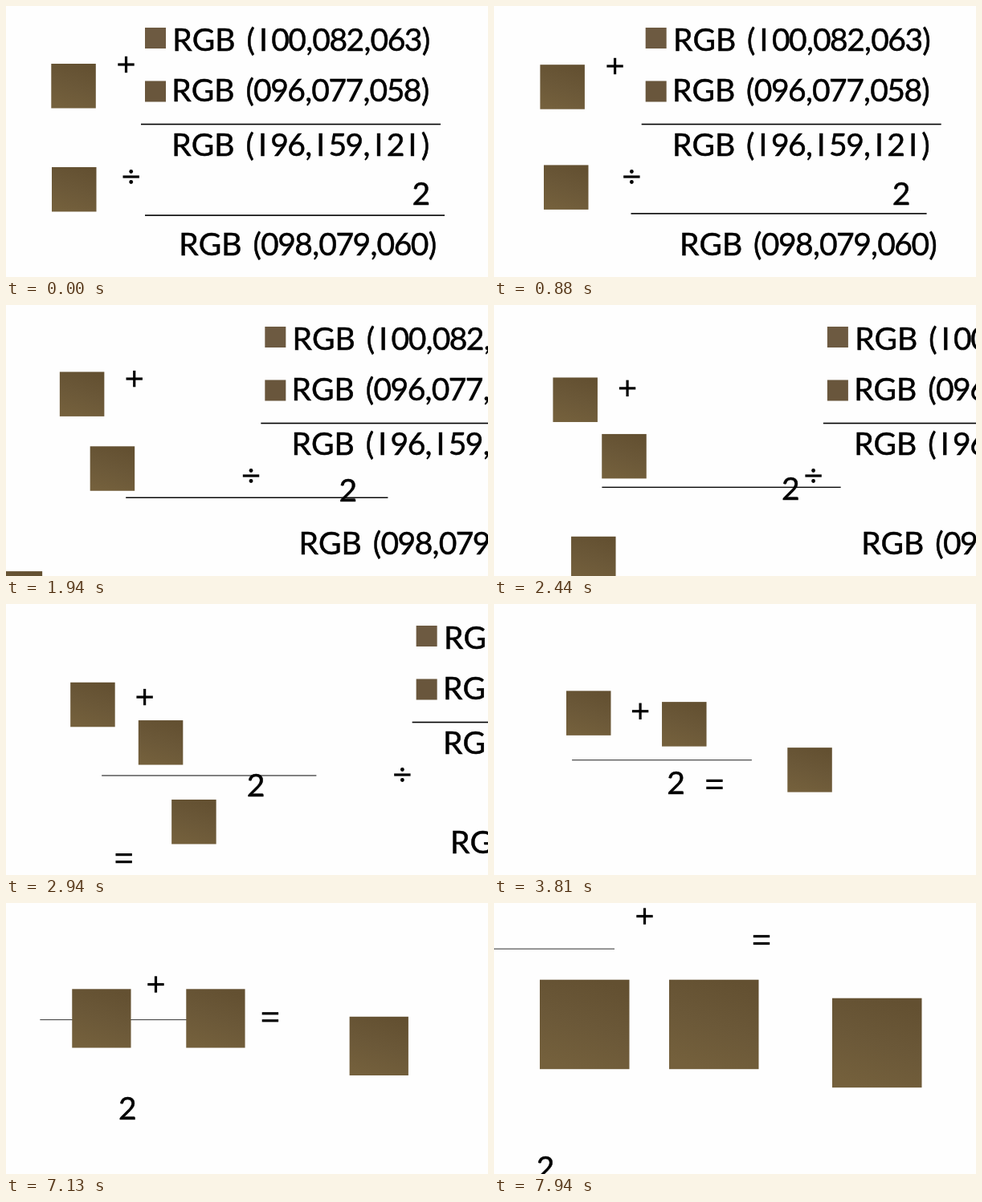
These frames come from a looping animation (600 px wide and 338 px high, 8 s). An HTML page with a canvas:

```html
<!DOCTYPE html>
<html>
<head>
<meta charset="utf-8">
<style>
html, body { margin: 0; width: 100%; height: 100%; overflow: hidden; background: #fefefe; }
canvas { display: block; }
</style>
</head>
<body>
<canvas id="stage" width="600" height="338"></canvas>
<script>
const ctx = document.getElementById('stage').getContext('2d');
const LOOP = 8000, STEP = 62.5, MOVE = 4330;
const INK = '#000';

const ease = (t, start) => {
  const u = Math.min(1, Math.max(0, (t - start) / MOVE));
  return (1 - Math.cos(Math.PI * u)) / 2;
};
const FIRST = 400, SECOND = 6185;
const lastEase = ease(LOOP - STEP, SECOND);

// Each part: its values at the start, in the fraction layout, and at the end of the loop.
const parts = {
  left:   [[56.3, 72, 55.5], [94, 112.7, 55.5], [57, 95.7, 111.5]],
  right:  [[57, 201, 55.5], [227.2, 112.7, 55.5], [218, 95.7, 111.5]],
  result: [[-182, 402, 55.5], [430.7, 152.5, 55.5], [421, 118.7, 111.5]],
  plus:   [[149.5, 73], [186, 141], [187.5, 16.5]],
  equals: [[-165, 542], [327, 187], [333, 46]],
  two:    [[516.7, 248], [192, 236], [64, 344]],
  bar:    [[173, 546, 261.1, 1.6], [88, 294, 186.7, 1], [-56, 150, 57.2, 1]]
};

const rect = (x, y, w, h, color = INK) => {
  ctx.fillStyle = color;
  ctx.fillRect(x, y, w, h);
};
const dash = (x, y) => rect(x - 10.2, y - 1.6, 20.4, 3.2);
const rule = (x1, x2, y, h) => rect(x1, y - h / 2, x2 - x1, h, h > 1.3 ? INK : '#333');

function leather(x, y, size) {
  const g = ctx.createLinearGradient(x + size * .7, y, x + size * .35, y + size);
  g.addColorStop(0, '#635031');
  g.addColorStop(.5, '#6b5838');
  g.addColorStop(1, '#74603c');
  rect(x, y, size, size, g);
}

// A thin outline gives the glyphs a little more weight.
function glyph(c, x, y) {
  ctx.fillText(c, x, y);
  ctx.strokeText(c, x, y);
}

// Digits are set tight; the one is a plain upright stroke.
function label(text, x, y) {
  ctx.fillStyle = INK;
  for (const c of text) {
    const digit = c >= '0' && c <= '9';
    const w = c === ' ' ? 14 : ctx.measureText(digit ? '0' : c).width - (digit ? 1.5 : 0);
    glyph(c === '1' ? 'I' : c, x + w / 2, y);
    x += w;
  }
}

function sums(dx) {
  rect(173 + dx, 27, 26, 26, '#6d5a41');
  rect(173 + dx, 93.5, 26, 26, '#69563c');
  label('RGB (100,082,063)', 207.3 + dx, 55.5);
  label('RGB (096,077,058)', 206.3 + dx, 119);
  rule(168 + dx, 541 + dx, 147.5, 1.6);
  label('RGB (196,159,121)', 206.3 + dx, 187);
  label('RGB (098,079,060)', 215.3 + dx, 310.5);
  dash(155.7 + dx, 213);
  for (const y of [206.5, 219.5]) {
    ctx.beginPath();
    ctx.arc(155.7 + dx, y, 2.4, 0, 7);
    ctx.fill();
  }
}

function draw(now) {
  const t = Math.floor((now % LOOP + 5) / STEP) * STEP % LOOP;
  const p = ease(t, FIRST), q = ease(t, SECOND) / lastEase;
  const at = name => {
    const [a, b, c] = parts[name];
    return a.map((v, i) => v + (b[i] - v) * p + (c[i] - b[i]) * q);
  };

  rect(0, 0, 600, 338, '#fefefe');
  ctx.font = '39px Lato, "Open Sans", sans-serif';
  ctx.textAlign = 'center';
  ctx.strokeStyle = INK;
  ctx.lineWidth = .5;
  if (p < 1) sums(533 * p);
  rule(...at('bar'));
  ['left', 'right', 'result'].forEach(name => leather(...at(name)));

  const [px, py] = at('plus');
  dash(px, py);
  rect(px - 1.6, py - 10.2, 3.2, 20.4);
  const [ex, ey] = at('equals');
  dash(ex, ey - 4.5);
  dash(ex, ey + 4.5);
  const [tx, ty] = at('two');
  glyph('2', tx, ty);
}

const start = performance.now();
(function frame() {
  draw(performance.now() - start);
  requestAnimationFrame(frame);
})();
</script>
</body>
</html>
```
